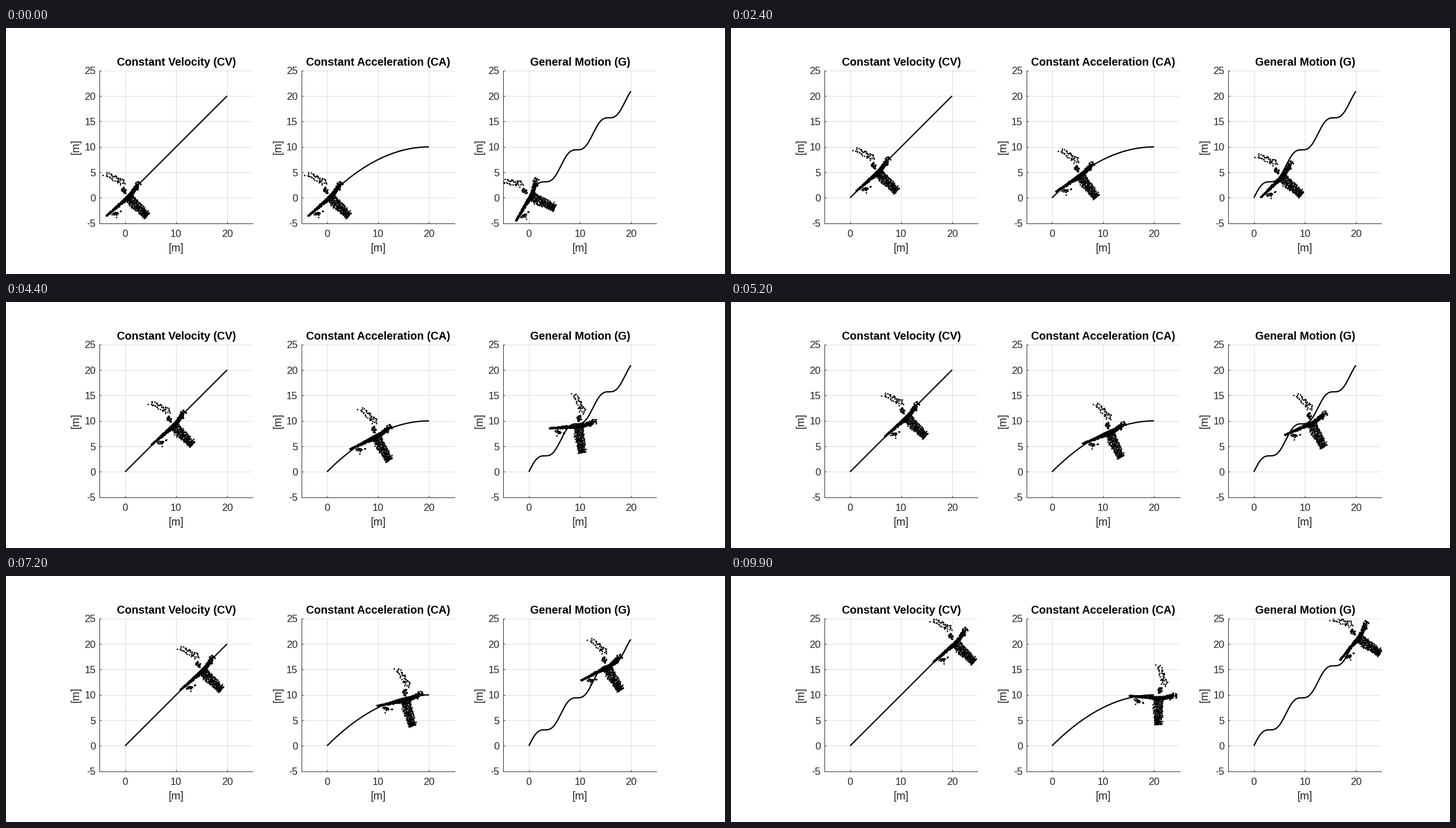
Recreate the animation shown at these times as a matplotlib script. Size 1277x438 px, loop 10000 ms.

```python
import numpy as np
import matplotlib.pyplot as plt
from matplotlib.animation import FuncAnimation

W, H, DPI = 1277, 438, 64
PX = 72 / DPI                # points per pixel
FRAMES = 100
INK = "#262626"
TOP, BOTTOM, SIDE = 75.6, 347.8, 271.8
UNIT = SIDE / 30             # pixels per metre
PIVOT = np.array([-2, -4]) / UNIT   # cloud's turning point relative to the path

plt.rcParams["font.family"] = "Liberation Sans"
rng = np.random.default_rng(7)


def band(n, x0, x1, low, high):
    """Random points between two edges given as (start, end) heights."""
    s = rng.random(n)
    lo = low[0] + (low[1] - low[0]) * s
    hi = high[0] + (high[1] - high[0]) * s
    return np.column_stack([x0 + (x1 - x0) * s, lo + (hi - lo) * rng.random(n)])


def right_wing():
    rows = []
    for s in np.linspace(0, 1, 14):
        x = np.linspace(1 + 2 * s, 17 - 2 * s, 16) + rng.normal(0, 0.8, 16)
        y = -5 - 41 * s + 0.2 * (x - 9) + rng.normal(0, 0.8, 16)
        rows.append(np.column_stack([x, y]))
    tip = np.linspace(3.5, 15.5, 16)
    rows.append(np.column_stack([tip, -47.5 + rng.normal(0, 0.4, 16)]))
    return np.vstack(rows)


def left_wing():
    s = np.linspace(0, 1, 17).repeat(3)
    side = np.tile([-1, 0.3, 1], 17)
    x = 10 + 9.5 * np.sqrt(s) + 4.2 * side + rng.normal(0, 1, s.size)
    y = 55 - 34 * s - 1.5 * side + rng.normal(0, 1.2, s.size)
    keep = rng.random(s.size) < 0.85
    outer = np.column_stack([x, y])[keep]
    root = band(26, 8, 17, (6, 9), (18, 21))
    return np.vstack([outer, root])


def tailplane():
    s = rng.random(22)
    x = -32 + 15 * s + rng.normal(0, 0.8, 22)
    y = -4 - 5.5 * s + rng.normal(0, 1.4, 22)
    return np.vstack([np.column_stack([x, y]), [[-31, -12.5], [-28, -9.5]]])


def make_plane():
    parts = [
        band(260, -42, 4, (2, -4), (3.4, 2.2)),
        band(110, 2, 20, (-4, -3.5), (1.5, 2.5)),
        band(85, 18, 34, (-3.5, -1), (2, 6)),
        band(30, 30, 42, (-4, -1), (7.5, 7.5)),
        right_wing(),
        left_wing(),
        tailplane(),
    ]
    return np.vstack(parts) / UNIT


PLANE = make_plane()

# title, left edge, height y(x), slope y'(x)
PANELS = [
    ("Constant Velocity (CV)", 166.2, lambda x: x, lambda x: 1.0),
    ("Constant Acceleration (CA)", 524.8,
     lambda x: x - x**2 / 40, lambda x: 1 - x / 20),
    ("General Motion (G)", 883.3,
     lambda x: x + np.sin(x), lambda x: 1 + np.cos(x)),
]

fig = plt.figure(figsize=(W / DPI, H / DPI), dpi=DPI, facecolor="white")


def label(x, y, text, size, **kw):
    kw = {"ha": "center", "va": "baseline", "color": INK, **kw}
    fig.text(x / W, 1 - y / H, text, fontsize=size * PX, **kw)


def make_panel(title, left, height):
    ax = fig.add_axes([left / W, 1 - BOTTOM / H, SIDE / W, (BOTTOM - TOP) / H])
    ax.set(xlim=(-5, 25), ylim=(-5, 25),
           xticks=[0, 10, 20], yticks=range(-5, 26, 5))
    ax.set_axisbelow(True)
    ax.grid(color=INK, alpha=0.15, linewidth=PX)
    ax.tick_params(direction="in", length=2.7 * PX, width=PX, color=INK,
                   labelbottom=False, labelleft=False)
    for name, spine in ax.spines.items():
        spine.set_visible(name in ("left", "bottom"))
        spine.set(color=INK, linewidth=PX)

    for v in (0, 10, 20):
        label(left + (v + 5) * UNIT, 372, str(v), 18)
    for v in range(-5, 26, 5):
        y = BOTTOM - (v + 5) * (BOTTOM - TOP) / 30
        label(left - 6.8, y + 6.6, str(v), 18, ha="right")
    mid = left + SIDE / 2
    label(mid, 397.5, "[m]", 19.7)
    label(left - 42, 211.5, "[m]", 19.7, rotation=90, va="center")
    label(mid + 0.4, 67, title, 19.7, weight="bold", color="black")

    x = np.linspace(0, 20, 400)
    ax.plot(x, height(x), color="black", linewidth=2.3 * PX,
            solid_capstyle="butt")
    dots, = ax.plot([], [], "o", color="black", markersize=2.7 * PX,
                    markeredgewidth=0)
    return dots


clouds = [make_panel(title, left, height) for title, left, height, _ in PANELS]


def update(frame):
    x = 20 * frame / (FRAMES - 1)
    for dots, (_, _, height, slope) in zip(clouds, PANELS):
        a = np.arctan(slope(x))
        c, s = np.cos(a), np.sin(a)
        px, py = PLANE.T
        dots.set_data(x + PIVOT[0] + c * px - s * py,
                      height(x) + PIVOT[1] + s * px + c * py)
    return clouds


anim = FuncAnimation(fig, update, frames=FRAMES, interval=100,
                     init_func=lambda: update(0), repeat=True, repeat_delay=0)
plt.show()
```
